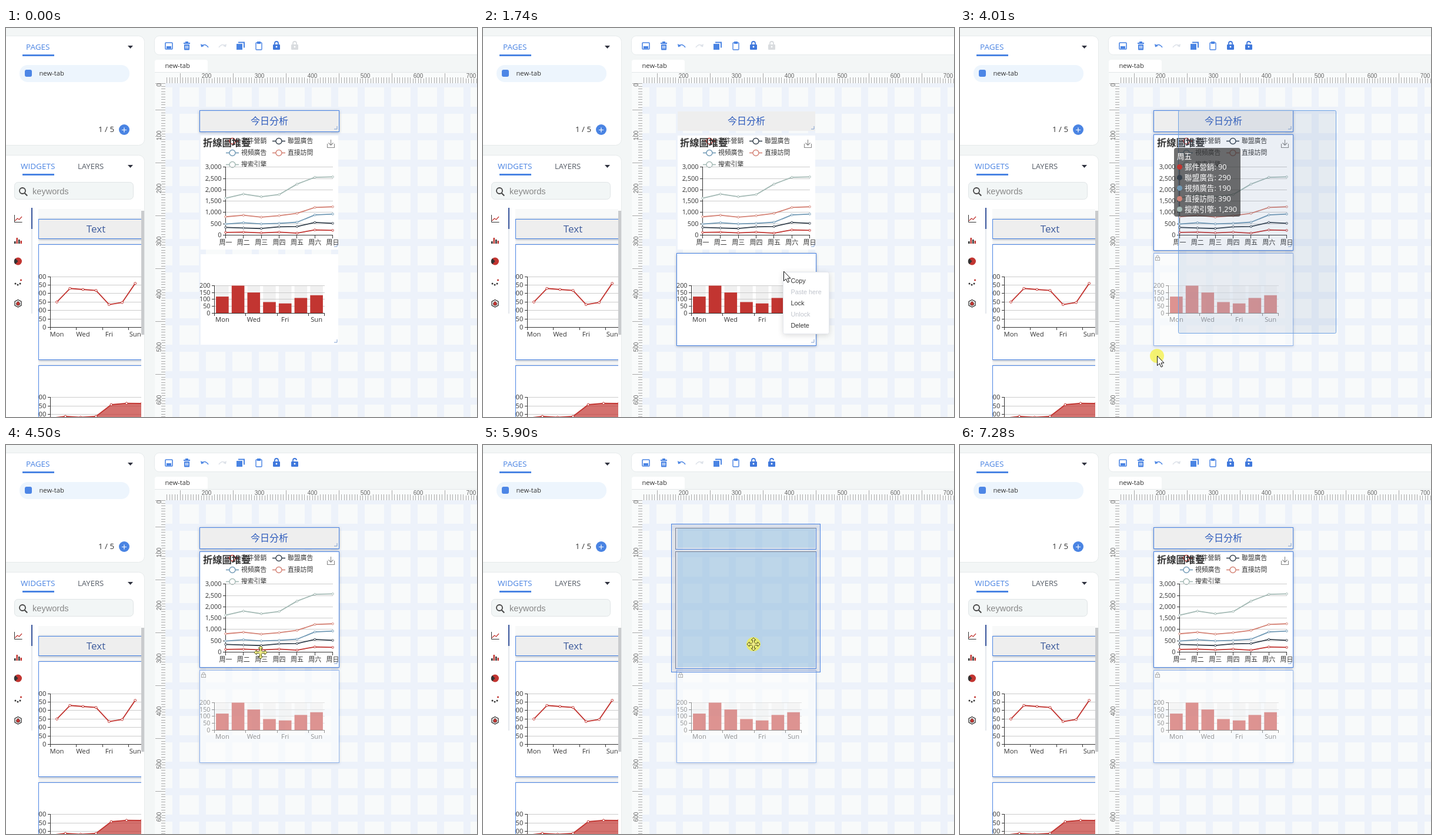
An HTML page that plays this animation: 801 by 662 pixels, repeating every 7620 ms.

```html
<!DOCTYPE html>
<html lang="en">
<head>
<meta charset="utf-8">
<title>Dashboard editor</title>
<style>
html, body { margin: 0; width: 100%; height: 100%; overflow: hidden; background: #f3f6f6; }
svg { display: block; width: 801px; height: 662px; font-family: 'Open Sans', 'Noto Sans', 'Noto Sans CJK TC', 'Noto Sans CJK', sans-serif; }
.crisp { shape-rendering: crispEdges; }
.shadow { filter: drop-shadow(0 1px 2px rgba(40, 60, 100, .4)); }
.arial { font-family: 'Liberation Sans', Arial, sans-serif; }
</style>
</head>
<body>
<svg id="stage" viewBox="0 0 801 662"></svg>
<script>
const LOOP = 7620, BLUE = '#4a84e3', RED = '#c23531', INK = '#333';
const range = (n, f) => Array.from({ length: n }, (_, i) => f(i));
const repeat = (n, f) => range(n, f).join('');
const rect = (x, y, w, h, fill, more = '') => `<rect x="${x}" y="${y}" width="${w}" height="${h}" fill="${fill}" ${more}/>`;
const circle = (x, y, r, fill, more = '') => `<circle cx="${x}" cy="${y}" r="${r}" fill="${fill}" ${more}/>`;
const path = (d, stroke, more = '') => `<path d="${d}" fill="none" stroke="${stroke}" ${more}/>`;
const shape = (d, fill, more = '') => `<path d="${d}" fill="${fill}" ${more}/>`;
const text = (x, y, size, fill, str, more = '') => `<text x="${x}" y="${y}" font-size="${size}" fill="${fill}" ${more}>${str}</text>`;
const group = (body, more = '') => `<g ${more}>${body}</g>`;
const MID = 'text-anchor="middle"', END = 'text-anchor="end"', CRISP = 'class="crisp"';

const series = (pts, color, r = 1.7) =>
  path('M' + pts.map(p => p.join()).join('L'), color, 'stroke-width="1.8" stroke-linejoin="round"') +
  pts.map(([x, y]) => circle(x, y, r, '#fff', `stroke="${color}"`)).join('');

// Horizontal grid lines with right-aligned value labels; the lowest is the axis.
function valueAxis(x0, x1, base, step, labels, size) {
  return labels.map((label, i) => {
    const y = base - i * step, py = Math.floor(y) + .5;
    return path(`M${x0} ${py}H${x1}`, i ? '#ccc' : INK, CRISP) +
      path(`M${x0 - 5} ${py}H${x0}`, INK, CRISP) + text(x0 - 7, y + 3.5, size, INK, label, END);
  }).join('') + path(`M${x0} ${base}V${base - step * (labels.length - 1)}`, INK, CRISP);
}

function lock(x, y, color, open) {
  return group(rect(-6, -2, 12, 9, color, 'rx="1.3"') +
    path(open ? 'M-3-2V-4A3 3 0 0 1 3-4' : 'M-3-2V-4A3 3 0 0 1 3-4V-2', color, 'stroke-width="1.8"') +
    circle(0, 2, 1.4, '#fff'), `transform="translate(${x} ${y})"`);
}

function sidePanels() {
  const frame = 'rx="10" stroke="#e6eaeb"';
  const arrow = y => shape(`M207 ${y}h9l-4.5 5z`, '#303340');
  return rect(-12, 13.5, 247.5, 186, '#fff', frame) + text(34, 37, 13.5, BLUE, 'PAGES') +
    rect(28, 45, 54, 3, BLUE) + arrow(30) + rect(23, 63, 187, 29, '#edf5fd', 'rx="14"') +
    rect(32, 71, 12, 12, '#4d86e6', 'rx="3"') + text(56.5, 81, 11.2, INK, 'new-tab') +
    text(157, 177, 13.3, INK, '1 / 5') + circle(201, 173, 9, BLUE) + path('M197 173.5h8M201 169.5v8', '#fff', 'stroke-width="1.2"') +
    rect(-12, 216.5, 247.5, 470, '#fff', frame) + text(25, 240, 13.5, BLUE, 'WIDGETS') +
    rect(28, 248, 54, 3, BLUE) + text(122, 240, 13.1, '#555c66', 'LAYERS') + arrow(233) +
    rect(14.5, 262.5, 202, 29, '#f2f6f6', 'rx="6" stroke="#e0e5e6"') +
    circle(28, 277, 5, 'none', 'stroke="#444" stroke-width="1.8"') + path('M31.7 281l4.5 4.5', '#444', 'stroke-width="2"') +
    text(45, 283, 14.6, '#888', 'keywords', 'class="arial"') + rect(43, 342, 2, 144, '#e4e7ed') + rect(43, 306, 2, 36, '#38549b');
}

function categoryIcons() {
  const bars = [[14, 4], [17.5, 10], [21, 7], [24.5, 5]];
  return path('M14.5 318v12.500h13', INK) + path('M15.500 328l4-4 3 2 4.500-5', RED, 'stroke-width="1.2"') +
    bars.map(([x, h], i) => rect(x, 367 - h, 2.5, h, i % 2 ? RED : INK)).join('') +
    circle(20.5, 397, 6.5, RED) + shape('M20.500 397L16 392A6.500 6.500 0 0 0 16 402z', INK) +
    [[16, 435], [20, 437], [24, 435]].map(p => circle(...p, 1.5, INK)).join('') + circle(25.5, 429, 1.6, RED) +
    path('M20.500 462.500l5.500 3v6.500l-5.500 3-5.500-3v-6.500z', INK, 'stroke-width="1.3"') + shape('M20.500 465l3 3v3l-3 1.500-3-1.500v-3z', RED, 'stroke="#333" stroke-width=".7"');
}

function gallery() {
  const days = ['Mon', 'Wed', 'Fri', 'Sun'];
  const pts = [150, 230, 224, 218, 135, 147, 260].map((v, i) => [86.5 + 22.2 * i, 509.5 - v * .288]);
  const area = [[75, 664], [101, 661], [127, 662.5], [153, 661], [179, 641], [205, 638.7], [231, 639]];
  const values = ['0', '50', '100', '150', '200', '250', '300'];
  const body = rect(55, 308, 175, 360, '#f8f9f9') +
    rect(55.5, 325.5, 195, 33, '#eee', `stroke="${BLUE}" class="shadow"`) + text(153, 348, 17, '#3d5b9c', 'Text', MID) +
    rect(55.5, 368.5, 195, 196, '#fff', `stroke="${BLUE}" class="shadow"`) + valueAxis(75.5, 235, 509.5, 14.4, values, 11.3) +
    days.map((d, i) => path(`M${75.5 + 44.4 * i} 509v5`, INK, CRISP) + text(86.5 + 44.4 * i, 525, 11.3, INK, d, MID)).join('') +
    series(pts, RED, 1.9) +
    rect(55.5, 574.5, 195, 120, '#fff', `stroke="${BLUE}" class="shadow"`) + valueAxis(75.5, 235, 715, 14.4, values, 11.3) +
    shape('M' + area.map(p => p.join()).join('L') + 'V700H75z', RED, 'opacity=".7"') + series(area, RED, 1.9);
  return group(body, 'clip-path="url(#galleryClip)"') + rect(230, 311, 5, 211, '#c9cbcd');
}

function toolbar() {
  return rect(252.5, 13.5, 580, 32, '#fff', 'rx="8" stroke="#e6eaeb"') +
    rect(271, 25, 12, 11, 'none', `stroke="${BLUE}" stroke-width="1.6" rx="1"`) + rect(273, 31, 8, 4, BLUE) +
    shape('M302 25h11v2h-11zM305 23h5v2h-5zM303 28h9v8.500q0 1-1 1h-7q-1 0-1-1z', BLUE) + path('M305.500 30v5M307.500 30v5M309.500 30v5', '#fff') +
    path('M333 30Q339 26 344 33', BLUE, 'stroke-width="1.5"') + shape('M331 27l1 5.500 5-2z', BLUE) +
    path('M373 30Q367 26 362 33', '#dce1e8', 'stroke-width="1.5"') + shape('M375 27l-1 5.500-5-2z', '#dce1e8') +
    rect(392, 27, 10, 10, BLUE) + path('M395 24.500h10v9', BLUE, 'stroke-width="2"') +
    rect(425, 25, 10, 12, '#fff', `stroke="${BLUE}" stroke-width="1.4" rx="1"`) + rect(427, 23, 6, 4, BLUE) + lock(460, 30, '#3f78dc') +
    group(lock(491, 30, '#d9dcdf'), 'id="unlockOff"') + group(lock(491, 30, '#3f78dc', true), 'id="unlockOn"') +
    shape('M253 75V58q0-4 4-4h82q4 0 4 4v17z', '#fff') + text(270.5, 68, 11.2, INK, 'new-tab');
}

function workspace() {
  const ticks = repeat(118, i => {
    const x = 273.5 + 4.5 * i, major = i % 10 === 5;
    return `M${x} ${major ? 77 : 84}V94`;
  });
  const rows = repeat(127, i => `M${i % 10 ? 264 : 254} ${94.5 + 4.5 * i}H271`);
  const num = 'text-anchor="middle" class="arial"';
  return rect(271, 94, 530, 568, '#f8fafa') +
    repeat(13, i => rect(271, 89 + 45 * i, 530, 12, '#edf2fa')) + repeat(12, i => rect(283 + 45 * i, 94, 12, 568, '#edf2fa')) +
    rect(253, 75, 548, 19, '#f9fbfb') + rect(253, 75, 18, 587, '#f9fbfb') +
    path('M253 75.500H801', '#e3e7e8') + path(ticks, '#aaa', CRISP) + path(rows, '#aaa', CRISP) +
    repeat(6, i => rect(331 + 90 * i, 77, 20, 9, '#f9fbfb') + text(341 + 90 * i, 85, 10, '#666', 200 + 100 * i, num)) +
    repeat(7, i => group(rect(-9, -8, 18, 9, '#f9fbfb', i ? '' : 'opacity="0"') + text(0, 0, 10, '#666', i * 100, num),
      `transform="translate(264 ${(i ? 93 : 97) + 90 * i}) rotate(-90)"`));
}

const names = ['郵件營銷', '聯盟廣告', '視頻廣告', '直接訪問', '搜索引擎'];
const colors = [RED, '#36424e', '#7099b5', '#d48275', '#a3b9b4'];
const days = ['周一', '周二', '周三', '周四', '周五', '周六', '周日'];
const data = [[120, 132, 101, 134, 90, 230, 210], [220, 182, 191, 234, 290, 330, 310], [150, 232, 201, 154, 190, 330, 410],
  [320, 332, 301, 334, 390, 330, 320], [820, 932, 901, 934, 1290, 1330, 1320]];
const dayX = i => 373.5 + 30.35 * i;
const stackY = (s, i) => 352.5 - data.slice(0, s + 1).reduce((sum, row) => sum + row[i], 0) * .0386;
const corner = (x, y) => path(`M${x - 5} ${y}H${x}V${y - 5}`, '#7f9fd0');

function lineChart() {
  const legend = names.map((name, i) => {
    const x = i % 2 ? 453 : 374, y = 192.5 + 20 * (i >> 1);
    return path(`M${x} ${y}h22`, colors[i], 'stroke-width="1.6"') + circle(x + 11, y, 5, '#fff', `stroke="${colors[i]}" stroke-width="1.4"`) +
      text(x + 26, y + 3.5, 10.8, INK, name);
  }).join('');
  return rect(331, 183, 234, 194, '#fff') + legend + text(335, 201, 16.3, INK, '折線圖堆疊', 'font-weight="bold"') +
    path('M546.500 197v6.500h12V197M552.500 190v9M548.500 195.500l4 4 4-4', '#888', 'stroke-width="1.1"') +
    valueAxis(373.5, 556, 352.5, 19.3, ['0', '500', '1,000', '1,500', '2,000', '2,500', '3,000'], 11) +
    days.map((d, i) => path(`M${dayX(i)} 353v5`, INK, CRISP) + text(dayX(i), 369, 11, INK, d, MID)).join('') +
    colors.map((c, s) => series(range(7, i => [dayX(i), stackY(s, i)]), c)).join('') + corner(563, 372);
}

function barChart() {
  const values = [120, 200, 150, 80, 70, 110, 130], left = i => 354.5 + 26.7 * i;
  return values.map((_, i) => rect(left(i) + 2.6, 438.5, 21.6, 46.5, '#f0f0f0')).join('') +
    valueAxis(354.5, 541.5, 485, 11.6, ['0', '50', '100', '150', '200'], 10.8) +
    values.map((v, i) => rect(left(i) + 2.6, 485 - v * .2325, 21.6, v * .2325, RED)).join('') +
    ['Mon', 'Wed', 'Fri', 'Sun'].map((d, i) => text(left(i * 2) + 13.4, 500, 11.2, INK, d, MID)).join('') +
    [0, 2, 4, 6, 7].map(i => path(`M${left(i)} 485v5`, INK, CRISP)).join('');
}

function widgets() {
  const border = (id, y, h, fill) => rect(329.5, y, 237, h, fill, `id="${id}" stroke="${BLUE}" class="shadow"`);
  return group(border('titleBorder', 140.5, 36, '#eee') + rect(331, 142, 234, 33, '#eee') +
      text(448, 164, 16, '#2c5abc', '今日分析', MID) + corner(563, 172), 'id="titleBox"') +
    group(border('lineBorder', 181.5, 197, '#fff') + lineChart(), 'id="lineBox"') +
    group(border('barBorder', 383.5, 157, '#fff') + group(rect(331, 385, 234, 154, '#fff') + corner(563, 535), 'id="barBack"') +
      group(barChart(), 'id="barChart"'), 'id="barBox"') +
    group(rect(332.5, 390.5, 7, 5, 'none', 'stroke="#aaa"') + path('M334 390v-1a2 2 0 0 1 4 0v1M336 392v2', '#aaa'), 'id="padlock"');
}

function dragGhost() {
  const boxes = [[140, 36], [180, 199]];
  return group(rect(322.5, 133.5, 253, 252, 'rgba(120,130,160,.18)', `stroke="${BLUE}"`) +
      boxes.map(([y, h]) => rect(329.5, y + .5, 239, h, 'none', 'stroke="#777f90"') +
        path(`M329.500 ${y + h + .5}h239v${-h}`, BLUE)).join(''), 'id="ghostFrame"') +
    group(boxes.map(([y, h]) => rect(331, y + 2, 234, h - 3, 'rgba(130,190,230,.38)')).join(''), 'id="ghostFill"');
}

const menuItems = ['Copy', 'Paste here', 'Lock', 'Unlock', 'Delete'];
function menu() {
  return rect(510.5, 415.5, 78, 105, '#fff', 'rx="3" stroke="#e4e7ed" style="filter:drop-shadow(0 2px 5px rgba(0,0,0,.14))"') +
    rect(511, 420, 77, 19, '#409eff', 'id="menuHover"') +
    menuItems.map((m, i) => text(523.5, 434 + 19 * i, 10.8, INK, m, `class="arial menuItem"`)).join('');
}

function cursors() {
  const arm = 'M-1.500-2V-7H-4L0-11 4-7H1.500V-2';
  const cross = [0, 90, 180, 270].map(a => shape(arm, '#efec88', `stroke="#55551f" transform="rotate(${a})"`)).join('');
  return circle(0, 0, 12, '#f5f03c', 'id="press" opacity=".72"') +
    group(shape('M.500 0V16.500L4.300 13 7 19l2.700-1.200L7 12H12z', '#fff', 'stroke="#111"'), 'id="arrow"') +
    group(shape('M-1.500 13V1.500Q-1.500 0 0 0t1.500 1.500V8q1-2 3 0 1.500-1.500 3 0 2-1 3 1v7l-2 6H0L-6 14q-1-3 1.500-3z', '#fff', 'stroke="#111" stroke-width="1.2"') +
      path('M4.500 9v4M7.500 9v4', '#111'), 'id="hand"') +
    group(cross + rect(-1.5, -3, 3, 6, '#efec88') + rect(-3, -1.5, 6, 3, '#efec88'), 'id="move"');
}

document.getElementById('stage').innerHTML =
  `<defs><clipPath id="galleryClip"><rect x="55" y="308" width="175" height="354"/></clipPath></defs>` +
  rect(0, 0, 801, 662, '#f3f6f6') + sidePanels() + categoryIcons() + gallery() + toolbar() + workspace() + widgets() +
  group(dragGhost(), 'id="ghost"') + rect(0, 0, 0, 0, 'rgba(90,125,175,.12)', 'id="marquee" stroke="#6fa3e4" rx="2"') +
  group('', 'id="pointer"') + group('', 'id="tooltip"') + group(menu(), 'id="menu"') + group(cursors(), 'id="cursor"');

const el = id => document.getElementById(id);
const show = (id, on) => el(id).setAttribute('display', on ? 'inline' : 'none');
const shift = (id, x, y) => el(id).setAttribute('transform', `translate(${x} ${y})`);
const clamp = v => Math.max(0, Math.min(1, v));

// Keys are [time, x, y, eased]; the flag smooths the stretch that ends at the key.
function follow(keys, t) {
  const i = keys.findIndex(k => k[0] > t);
  if (i < 0) return keys[keys.length - 1].slice(1, 3);
  if (!i) return keys[0].slice(1, 3);
  const a = keys[i - 1], b = keys[i];
  let p = (t - a[0]) / (b[0] - a[0]);
  if (b[3]) p = p * p * (3 - 2 * p);
  return [1, 2].map(k => a[k] + (b[k] - a[k]) * p);
}

const cursorKeys = [[70, 758, 628], [830, 537, 270, 1], [1040, 537, 275], [1530, 511, 414, 1], [1740, 511, 414], [2210, 514, 421],
  [2600, 538, 461, 1], [3050, 538, 461], [3480, 640, 140, 1], [3590, 640, 140], [3790, 496, 339], [3950, 373, 519], [4000, 335, 558],
  [4130, 335, 558], [4570, 440, 338, 1],
  [4640, 440, 338], [5070, 582, 333, 1], [5350, 596, 335], [5420, 588, 336], [5560, 427, 337], [5720, 427, 337], [5900, 460, 339],
  [6110, 462, 339], [6460, 602, 366, 1], [6530, 606, 372], [7250, 748, 655, 1]];
const dragKeys = [[4640, 0, 0], [5070, 156, -5, 1], [5350, 162, -4], [5420, 150, -2], [5560, -35, -1], [5720, -35, -1], [5900, -2, 1], [6110, 0, 0]];
const MARQUEE = 3590, RELEASE = 4130, DRAG = 4640, DROP = 6110, LOCKED = 3050, TOUCH = 3790;

function tipState(t) {
  const dragging = t > 3700 && t < 4250;
  if (!dragging && !(t > 600 && t < 1330)) return null;
  const [x, y] = follow(cursorKeys, dragging ? Math.min(t, TOUCH) : t);
  if (x > 560 || y < 237 || y > 353) return null;
  return { x, y, day: Math.min(6, Math.round((x - 373) / 30.4)), pointer: !dragging || t < TOUCH, alpha: dragging ? clamp((4250 - t) / 200) : 1 };
}

function drawTip(tip) {
  show('tooltip', tip);
  show('pointer', tip && tip.pointer);
  if (!tip) return;
  const { day } = tip, px = dayX(day);
  el('pointer').innerHTML = path(`M${px} 237V352`, '#aaa') +
    colors.map((c, s) => circle(px, stackY(s, day), 4.5, '#fff', `stroke="${c}" stroke-width="1.3"`)).join('');
  el('tooltip').innerHTML = rect(0, 0, 113, 117, 'rgba(50,50,50,.7)', 'rx="4"') + text(5, 19, 12.6, '#fff', days[day]) +
    names.map((n, s) => circle(9.5, 32.5 + 18 * s, 4.5, colors[s]) +
      text(18, 37 + 18 * s, 12.6, '#fff', `${n}: ${data[s][day].toLocaleString('en-US')}`)).join('');
  el('tooltip').setAttribute('opacity', tip.alpha);
  shift('tooltip', Math.round(tip.x - 132), Math.round(tip.y - 135));
}

function drawMenu(t, y) {
  const open = t >= 1740 && t < LOCKED, row = Math.floor((y - 420) / 19);
  show('menu', open);
  if (!open) return;
  const hover = row === 0 || row === 2 || row === 4;
  show('menuHover', hover);
  el('menuHover').setAttribute('y', 420 + 19 * row);
  document.querySelectorAll('.menuItem').forEach((item, i) =>
    item.setAttribute('fill', i === 1 || i === 3 ? '#c0c4cc' : i === row ? '#fff' : INK));
}

function render(t) {
  const [x, y] = follow(cursorKeys, t);
  const dragging = t >= DRAG && t < DROP, picked = t >= 3940, locked = t >= LOCKED;
  const selecting = t >= MARQUEE && t < RELEASE;
  show('titleBox', !dragging);
  show('lineBox', !dragging);
  show('titleBorder', t < 700 || picked);
  show('lineBorder', (t >= 700 && t < 1400) || picked);
  show('barBorder', t >= 1400);
  el('barBorder').setAttribute('opacity', locked ? .55 : 1);
  show('barBack', !locked);
  el('barChart').setAttribute('opacity', locked ? .52 : 1);
  show('padlock', locked);
  show('unlockOn', locked);
  show('unlockOff', !locked);

  show('ghost', dragging);
  const [dx, dy] = follow(dragKeys, t);
  shift('ghostFrame', Math.round(dx), Math.round(dy));
  shift('ghostFill', Math.round(dx / 18) * 18, Math.round(dy / 18) * 18);

  show('marquee', selecting);
  if (selecting) {
    const [mx, my] = follow(cursorKeys, Math.max(MARQUEE, t - 60));
    const box = { x: Math.round(mx) - .5, y: 140.5, width: 640 - Math.round(mx), height: Math.max(0, Math.round(my) - 141) };
    for (const key in box) el('marquee').setAttribute(key, box[key]);
  }

  drawTip(tipState(t));
  drawMenu(t, y);
  const inMenu = t >= 2210 && t < LOCKED, moving = t >= 4500 && t < DROP + 60;
  show('cursor', t >= 70 && t < 7250);
  shift('cursor', Math.round(x), Math.round(y));
  show('press', selecting || dragging);
  show('hand', inMenu);
  show('move', moving);
  show('arrow', !inMenu && !moving);
}

const start = performance.now();
function tick() {
  render((performance.now() - start) % LOOP);
  requestAnimationFrame(tick);
}
tick();
</script>
</body>
</html>
```
